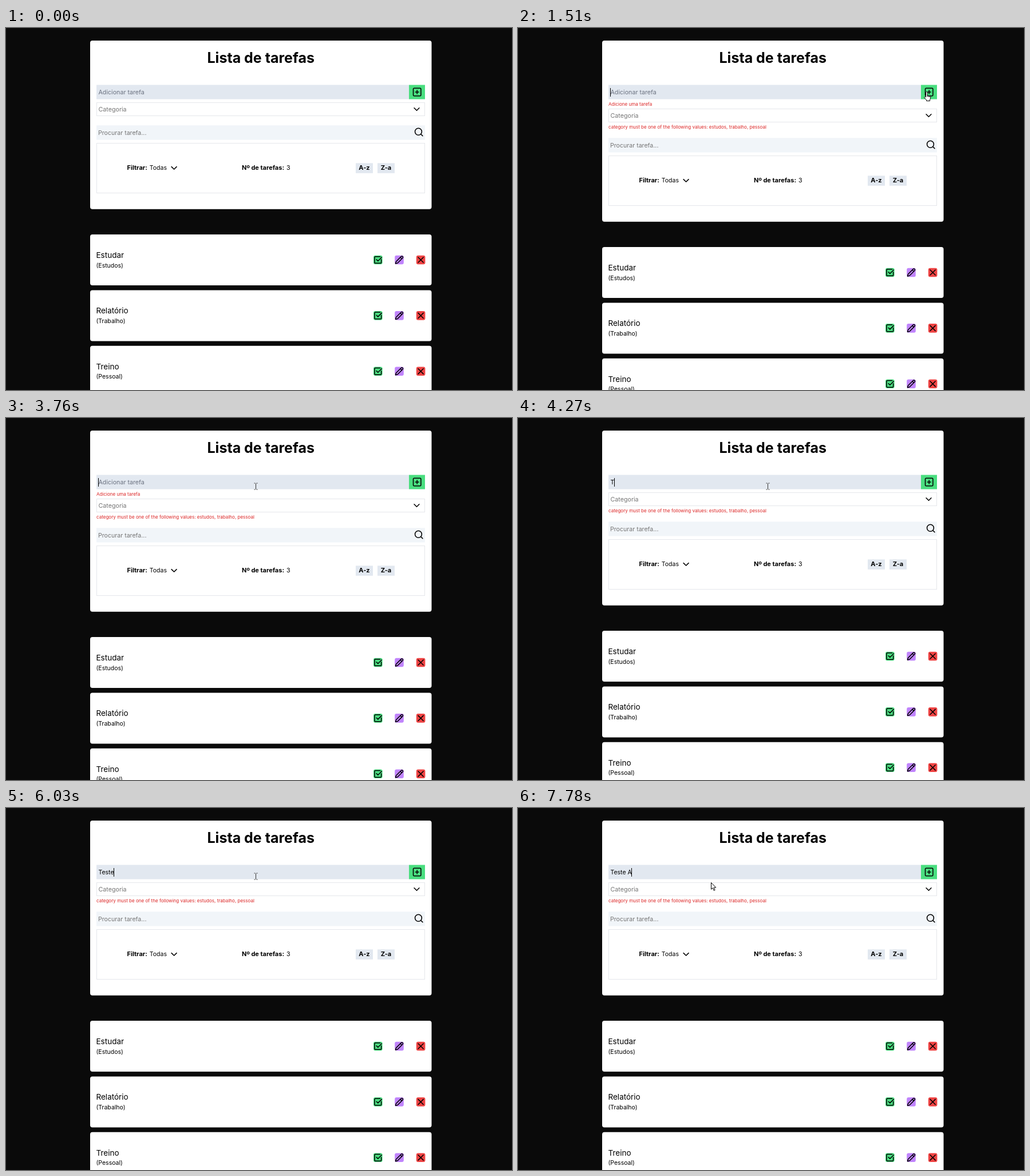
An HTML page with a canvas for the animation above (8 s loop, 884 px wide and 633 px high).

```html
<!DOCTYPE html>
<html lang="pt">
<head>
<meta charset="utf-8">
<title>Lista de tarefas</title>
<style>
html, body { margin: 0; width: 100%; height: 100%; overflow: hidden; background: #0a0a0a; }
canvas { display: block; width: 884px; height: 633px; }
</style>
</head>
<body>
<canvas id="stage" width="884" height="633"></canvas>
<script>
const ctx = document.getElementById('stage').getContext('2d');
const LOOP = 8000;
const FONT = 'Inter, "Open Sans", sans-serif';
const SLATE = '#e2e8f0', GREEN = '#4ade80', GRAY = '#757575', RED = '#dc2626';

// Outlines on a 24 unit grid
const icons = {
  plus: 'M5 3h14a2 2 0 0 1 2 2v14a2 2 0 0 1-2 2H5a2 2 0 0 1-2-2V5a2 2 0 0 1 2-2ZM8 12h8M12 8v8',
  chevron: 'm6 9 6 6 6-6',
  search: 'M3 11a8 8 0 1 0 16 0a8 8 0 1 0-16 0M21 21l-4.3-4.3',
  check: 'm8 11 4 4L22 5M21 11v8a2 2 0 0 1-2 2H5a2 2 0 0 1-2-2V5a2 2 0 0 1 2-2h13',
  pencil: 'M17 3a2.85 2.83 0 1 1 4 4L7.5 20.5 2 22l1.5-5.5ZM15 5l4 4',
  cross: 'M19 5 5 19M5 5l14 14'
};
for (const name in icons) icons[name] = new Path2D(icons[name]);

const arrow = new Path2D('M.5.5V12.2l2.7-2.5 2 4.6 1.9-.8-2-4.4H8.8Z');
const hand = new Path2D('M3.5 10V1.8a1.3 1.3 0 0 1 2.6 0V7l4.2.9c1 .2 1.5.8 1.5 1.8 0 2-.5 3.3-1.2 4.6v2.2H4.6v-1.6L1 11c-.8-1 .5-2.2 1.4-1.5Z');
const knuckles = new Path2D('M6.1 7v2.2M8 7.6v2M9.9 8v2');
const beam = new Path2D('M-3-5.5h2M1-5.5h2M-3 5.5h2M1 5.5h2M0-5V5');

// Hard steps: start time, then the values held from there
const pointerSteps = [
  [0, ''],
  [250, 'arrow', 848, 316], [500, 'arrow', 817, 256], [750, 'arrow', 767, 182],
  [1010, 'hand', 709, 115], [1260, 'hand', 709, 111],
  [2010, 'beam', 690.5, 119.5], [2260, 'beam', 610.5, 119.5],
  [2510, 'beam', 510.5, 119.5], [2760, 'beam', 446.5, 119.5], [3010, 'beam', 436.5, 119.5],
  [7280, 'arrow', 402, 88], [7530, 'beam', 362.5, 112.5], [7780, 'arrow', 337, 130]
];
const typingSteps = [
  [0, ''], [4270, 'T'], [4520, 'Te'], [4770, 'Tes'], [5010, 'Test'],
  [6030, 'Teste'], [6280, 'Teste '], [6530, 'Teste A']
];
const caretSteps = [
  [0, false], [1510, true], [2010, false], [2510, true], [3260, false],
  [3760, true], [5530, false], [6030, true], [7030, false], [7530, true]
];
const tasks = [['Estudar', 'Estudos'], ['Relatório', 'Trabalho'], ['Treino', 'Pessoal']];

function held(steps, t) {
  let now = steps[0];
  for (const step of steps) if (step[0] <= t) now = step;
  return now;
}

function text(str, x, y, size, color = '#000', weight = 400, align = 'left') {
  ctx.font = `${weight} ${size}px ${FONT}`;
  ctx.fillStyle = color;
  ctx.textAlign = align;
  ctx.fillText(str, x, y);
}

function box(x, y, w, h, color, radius = 0) {
  ctx.fillStyle = color;
  ctx.beginPath();
  ctx.roundRect(x, y, w, h, radius);
  ctx.fill();
}

function frame(x, y, w, h) {
  ctx.strokeStyle = '#e5e7eb';
  ctx.lineWidth = 1;
  ctx.strokeRect(x + .5, y + .5, w - 1, h - 1);
}

function icon(name, cx, cy, scale = .74, width = 2.1) {
  ctx.save();
  ctx.translate(cx, cy);
  ctx.scale(scale, scale);
  ctx.translate(-12, -12);
  ctx.strokeStyle = '#000';
  ctx.lineWidth = width;
  ctx.lineCap = ctx.lineJoin = 'round';
  ctx.stroke(icons[name]);
  ctx.restore();
}

function badge(name, cx, cy, color) {
  box(cx - 7.8, cy - 7.8, 15.6, 15.6, color, 3);
  icon(name, cx, cy, .65, 2.3);
}

function taskCard([title, category], y) {
  box(147, y, 596.5, 89, '#fff', 4);
  text(title, 157.5, y + 41, 13.5);
  text(`(${category})`, 157.5, y + 57.6, 10.5);
  badge('check', 649.8, y + 44.5, GREEN);
  badge('pencil', 687, y + 44.5, '#c084fc');
  badge('cross', 724.6, y + 44.5, '#ef4444');
}

function taskInput(typed, caretOn) {
  box(158, 99.5, 546, 25, SLATE);
  box(704, 99.5, 28, 25, GREEN);
  icon('plus', 718.2, 112);
  if (typed) text(typed, 161.5, 116, 10.5);
  else text('Adicionar tarefa', 161.5, 116, 10.7, '#6b7280');
  if (!caretOn) return;
  const width = typed ? ctx.measureText(typed).width : 0;
  ctx.fillStyle = '#000';
  ctx.fillRect(Math.floor(161.5 + width), 105, 1, 15);
}

function filterPanel(y) {
  frame(158, y, 574, 88);
  const base = y + 47.4;
  text('Filtrar:', 211.5, base, 11, '#000', 700);
  text('Todas', 250.8, base, 10.5);
  icon('chevron', 293.6, y + 43.8);
  text('Nº de tarefas:', 412, base, 11, '#000', 700);
  text('3', 490, base, 10.7);
  box(611, y + 35.3, 30, 17.5, SLATE);
  box(649, y + 35.3, 30, 17.5, SLATE);
  text('A-z', 626, base, 11, '#000', 700, 'center');
  text('Z-a', 664, base, 11, '#000', 700, 'center');
}

function pointer([, kind, x, y]) {
  if (!kind) return;
  ctx.save();
  ctx.translate(x, y);
  ctx.lineCap = 'butt';
  ctx.lineJoin = 'round';
  ctx.lineWidth = 1;
  ctx.strokeStyle = '#000';
  ctx.fillStyle = '#fff';
  if (kind === 'beam') {
    ctx.strokeStyle = '#333';
    ctx.stroke(beam);
  } else {
    const shape = kind === 'hand' ? hand : arrow;
    ctx.fill(shape);
    ctx.stroke(shape);
    if (kind === 'hand') ctx.stroke(knuckles);
  }
  ctx.restore();
}

function draw(t) {
  const typed = held(typingSteps, t)[1];
  const submitted = t >= 1510;
  const gap = submitted && !typed ? 11 : 0;
  const shift = gap + (submitted ? 11 : 0);

  ctx.fillStyle = '#0a0a0a';
  ctx.fillRect(0, 0, 884, 633);
  box(147, 22, 596.5, 294.7 + shift, '#fff', 4);
  text('Lista de tarefas', 445.2, 60.5, 25, '#000', 700, 'center');

  taskInput(typed, held(caretSteps, t)[1]);
  if (gap) text('Adicione uma tarefa', 158, 135.8, 8.05, RED);

  frame(158, 130 + gap, 574, 24);
  text('Categoria', 161.5, 145.6 + gap, 10.7, GRAY);
  icon('chevron', 717.5, 142 + gap);
  if (submitted) {
    text('category must be one of the following values: estudos, trabalho, pessoal',
      158, 164.9 + gap, 8.05, RED);
  }

  box(158, 170.3 + shift, 574, 25.2, '#f1f5f9');
  text('Procurar tarefa...', 161, 187 + shift, 10.6, GRAY);
  icon('search', 721.2, 182 + shift);
  filterPanel(201 + shift);

  tasks.forEach((task, i) => taskCard(task, 361 + shift + i * 97.4));
  pointer(held(pointerSteps, t));
}

function tick() {
  draw(performance.now() % LOOP);
  requestAnimationFrame(tick);
}
tick();
</script>
</body>
</html>
```
